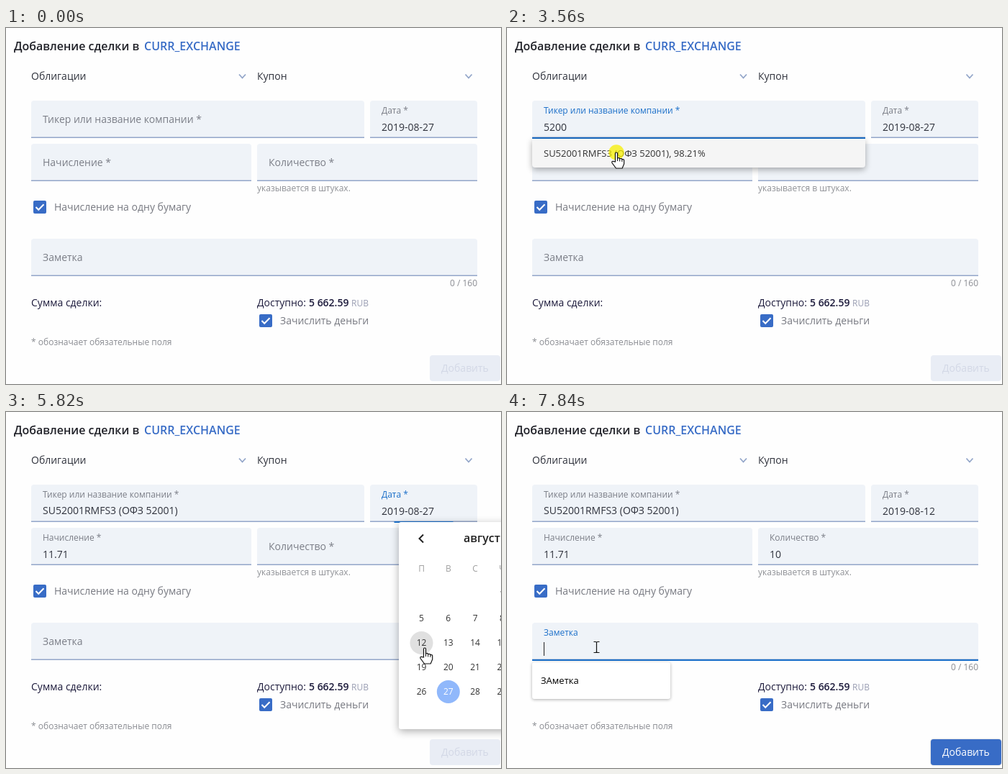
Write an HTML page with a canvas that moves like this. It is 688 px wide and 495 px high and loops after 8000 ms.

```html
<!DOCTYPE html>
<html lang="ru">
<head>
<meta charset="utf-8">
<style>
  html, body { margin: 0; width: 100%; height: 100%; overflow: hidden; background: #fefefe; }
  canvas { display: block; }
</style>
</head>
<body>
<canvas id="stage" width="688" height="495"></canvas>
<script>
const LOOP = 8000;
const ctx = document.getElementById('stage').getContext('2d');
const BLUE = '#1b6fc9', ACCENT = '#386cc6', DARK = '#30333d', NAVY = '#1d1b3c', GRAY = '#7b7e87', LINE = '#93a6c9';

// Event times, ms
const T = {
  tickerFocus: 740, search: 1316, searchFrozen: 2490, list: 2740, picked: 3700, accrual: 4070,
  dateFocus: 4400, calendar: 4560, day: 5900, calendarEnd: 5960,
  qtyFocus: 6210, qty1: 6330, qty2: 6430, noteFocus: 7470, notePanel: 7640
};
const clicks = [620, 3490, T.dateFocus, 5880, T.qtyFocus, T.noteFocus];
const keys = [1420, 1550, 1690, 1820];
const route = [
  [100, 507, 421], [540, 146, 128], [620, 148, 150], [3260, 148, 150], [3480, 152, 173],
  [3650, 152, 173], [4150, 541, 130], [4450, 541, 130], [4850, 600, 188], [4920, 600, 188],
  [5510, 585, 358], [5690, 585, 358], [5780, 582, 328], [5930, 582, 328], [6200, 414, 203],
  [7100, 414, 203], [7320, 200, 360], [7450, 124, 327]
];
const cursors = {
  hand: new Path2D('M-1.5 13V1.5a1.5 1.5 0 0 1 3 0V8q3-1 3.2.8q3-.9 3.2.9q2.8-.5 2.8 1.6V16l-2.5 6H-.5L-6 14.5q-.6-2.5 1.5-2.2z'),
  arrow: new Path2D('M0 0V16L4 12.5L6.5 18.5L9 17.5L6.5 11.5H11.5Z'),
  beam: new Path2D('M-4-7.5h2.5q1.5 0 1.5 1.5V6q0 1.5-1.5 1.5H-4M4-7.5H1.5Q0-7.5 0-6V6q0 1.5 1.5 1.5H4')
};

const clamp = v => Math.max(0, Math.min(1, v));
const smooth = v => (v = clamp(v), v * v * (3 - 2 * v));
const mix = (a, b, u) => a + (b - a) * u;
const ramp = (t, start, ms) => smooth((t - start) / ms);
const within = (p, x, y, w, h) => p.x >= x && p.x <= x + w && p.y >= y && p.y <= y + h;

function text(s, x, y, color = DARK, size = 14, weight = 400, align = 'left') {
  ctx.font = `${weight} ${size}px "Open Sans", sans-serif`;
  ctx.textAlign = align;
  ctx.fillStyle = color;
  ctx.fillText(s, x, y);
  return x + ctx.measureText(s).width;
}

function rect(x, y, w, h, color, radius = 0) {
  ctx.fillStyle = color;
  ctx.beginPath();
  ctx.roundRect(x, y, w, h, radius);
  ctx.fill();
}

function disc(x, y, r, color) {
  ctx.fillStyle = color;
  ctx.beginPath();
  ctx.arc(x, y, r, 0, 7);
  ctx.fill();
}

function polyline(points, color, width) {
  ctx.strokeStyle = color;
  ctx.lineWidth = width;
  ctx.beginPath();
  points.forEach(p => ctx.lineTo(...p));
  ctx.stroke();
}

function panel(x, y, w, h, color, blur, offset, radius = 3) {
  ctx.save();
  ctx.shadowColor = 'rgba(0,0,0,.32)';
  ctx.shadowBlur = blur;
  ctx.shadowOffsetY = offset;
  rect(x, y, w, h, color, radius);
  ctx.restore();
}

function faded(alpha, draw) {
  if (alpha <= 0) return;
  ctx.save();
  ctx.globalAlpha = alpha;
  draw();
  ctx.restore();
}

function field(t, x, y, w, label, value, o = {}) {
  const { focus = Infinity, blur = Infinity, floatAt = focus, caret = focus, baseline = 42, grow = 1 } = o;
  const focused = t >= focus && t < blur;
  const up = ramp(t, floatAt, 200);
  rect(x, y, w, 52, '#eff3f8', [4, 4, 0, 0]);
  rect(x, y + 50.5, w, 1.5, LINE);
  if (focused) {
    const line = w * grow * ramp(t, focus, 240);
    rect(x + (w - line) / 2, y + 51, line, 2, BLUE);
  }
  text(label, x + 16, y + mix(31, 18, up), focused ? BLUE : GRAY, mix(14, 12, up));
  const end = text(value, x + 16, y + baseline);
  const lit = t < caret || Math.floor((t - caret) / 530) % 2 === 0;
  if (focused && lit && !o.noCaret) rect(Math.round(end), y + 27, 1, 19, '#222');
}

function checkbox(x, y, label) {
  rect(x, y, 18, 18, ACCENT, 2);
  polyline([[x + 3.5, y + 9], [x + 7.2, y + 12.8], [x + 14.5, y + 5.2]], '#fff', 2);
  text(label, x + 29, y + 14, '#777981');
}

function select(x, label, arrowX) {
  text(label, x, 72);
  polyline([[arrowX - 4.5, 64.5], [arrowX, 69.5], [arrowX + 4.5, 64.5]], LINE, 1.8);
}

// Sliding segment of an indeterminate bar with a two second cycle
function searchBar(t) {
  const p = (Math.min(t, T.searchFrozen) - T.search) / 2000;
  const keyed = stops => {
    const i = stops.findIndex(s => p < s[0]);
    const [p0, v0] = stops[i - 1], [p1, v1] = stops[i];
    return mix(v0, v1, (p - p0) / (p1 - p0));
  };
  const center = keyed([[0, 0], [.25, .3765], [.4835, .8439], [1, 1.6028]]) - .0489;
  const size = keyed([[0, .08], [.1915, .4571], [.4415, .728], [1, .08]]);
  const left = clamp(center - size / 2), right = clamp(center + size / 2);
  rect(35, 152, 463, 2, '#b5d0ee');
  rect(35 + 463 * left, 152, 463 * (right - left), 2, BLUE);
}

function calendar(t) {
  panel(546, 153, 300, 288, '#fff', 12, 3);
  polyline([[580, 170.5], [574.5, 176], [580, 181.5]], '#222', 2);
  text('август 2019', 636, 181, '#222', 16, 600);
  [...'ПВСЧ'].forEach((d, i) => text(d, 577.5 + 37.3 * i, 222, '#a0a0a0', 12, 400, 'center'));
  for (let day = 1; day <= 31; day++) {
    const cell = day + 2, x = 577.5 + 37.3 * (cell % 7), y = 253 + 34 * Math.floor(cell / 7);
    if (day === 27) disc(x, y, 16, '#90b8fb');
    if (day === 12 && t > 5740) disc(x, y, 16, '#e0e0e0');
    text(day, x, y + 4, day === 27 ? '#fff' : '#333', 12, 400, 'center');
  }
}

function pointerAt(t) {
  const i = route.findIndex(p => p[0] > t);
  if (i < 0) return { x: 124, y: 327 };
  const [t0, x0, y0] = route[i - 1], [t1, x1, y1] = route[i];
  const u = smooth((t - t0) / (t1 - t0));
  return { x: mix(x0, x1, u), y: mix(y0, y1, u) };
}

function cursorKind(t, p) {
  const listOpen = t > T.list && t < T.picked + 100 && within(p, 35, 154, 463, 40);
  const calendarOpen = t > T.calendar && t < T.calendarEnd && within(p, 546, 153, 142, 288);
  if (listOpen || calendarOpen || within(p, 506, 101, 149, 52)) return 'hand';
  const overField = within(p, 35, 101, 463, 52) || within(p, 35, 161, 306, 52) ||
    within(p, 349, 161, 306, 52) || within(p, 35, 293, 620, 52);
  return overField ? 'beam' : 'arrow';
}

function drawPointer(t) {
  if (t < 100) return;
  const p = pointerAt(t), kind = cursorKind(t, p);
  const click = clicks.find(c => t >= c && t < c + 200);
  if (click) disc(p.x, p.y, 15 - (t - click) * .06, 'rgba(245,238,0,.75)');
  ctx.save();
  ctx.translate(Math.round(p.x), Math.round(p.y));
  ctx.lineWidth = 1.2;
  ctx.strokeStyle = '#111';
  if (kind !== 'beam') {
    ctx.fillStyle = '#fff';
    ctx.fill(cursors[kind]);
  } else {
    ctx.translate(.5, 0);
  }
  ctx.stroke(cursors[kind]);
  if (kind === 'hand') {
    ctx.lineWidth = 1;
    ctx.stroke(new Path2D('M1.5 8v4M4.7 9v3.5M7.9 10v3'));
  }
  ctx.restore();
}

function draw(t) {
  rect(0, 0, 688, 495, '#fefefe');
  text('Добавление сделки в', 11, 31, '#212229', 16, 600);
  text('CURR_EXCHANGE', 192, 31, ACCENT, 16, 600);
  select(35, 'Облигации', 328.5);
  select(349, 'Купон', 643);

  const picked = t >= T.picked;
  const query = '5200'.slice(0, keys.filter(k => t >= k).length);
  const quantity = t >= T.qty2 ? 10 : t >= T.qty1 ? 1 : 0;

  field(t, 35, 101, 463, 'Тикер или название компании *', picked ? 'SU52001RMFS3 (ОФЗ 52001)' : query, {
    focus: T.tickerFocus, blur: T.dateFocus, noCaret: picked,
    caret: t < keys[0] ? 660 : t < keys[3] ? t : keys[3], baseline: picked ? 41 : 42
  });
  field(t, 506, 101, 149, 'Дата *', t < T.day ? '2019-08-27' : '2019-08-12', {
    focus: T.dateFocus, blur: T.qtyFocus, floatAt: -1000, noCaret: true, grow: .55
  });
  field(t, 35, 161, 306, 'Начисление *', t >= T.accrual ? '11.71' : '', { floatAt: T.accrual });
  field(t, 349, 161, 306, 'Количество *', quantity || '', {
    focus: T.qtyFocus, blur: T.noteFocus, caret: 6530
  });
  text('указывается в штуках.', 349, 227, '#8f9196', 12);
  checkbox(38, 240, 'Начисление на одну бумагу');
  field(t, 35, 293, 620, 'Заметка', '', { focus: T.noteFocus });
  text('0 / 160', 655, 359, '#8a8c92', 12, 400, 'right');

  text('Сумма сделки:', 35, 387, NAVY);
  if (quantity) {
    const end = text((11.71 * quantity).toFixed(2), 137, 387, NAVY, 16, 600);
    text('RUB', end + 4, 387, '#9a9eb3', 12);
  }
  text('Доступно:', 349, 387, NAVY);
  text('5 662.59', 421, 387, NAVY, 14, 600);
  text('RUB', 480, 387, '#9a9eb3', 12);
  checkbox(352, 398, 'Зачислить деньги');
  text('* обозначает обязательные поля', 35, 441, '#8a8c92', 12);

  rect(589, 455, 98, 36, '#e9edf5', 4);
  text('Добавить', 605, 478, '#d3d8e6');
  faded(ramp(t, T.qty1, 100), () => {
    panel(589, 455, 98, 36, ACCENT, 2, 0, 4);
    text('Добавить', 605, 478, '#fff');
  });

  if (t >= keys[0] && t < T.list) searchBar(t);
  faded(ramp(t, T.list, 220) * (1 - ramp(t, T.picked, 100)), () => {
    panel(35, 154, 463, 40, '#f5f5f5', 8, 3, [0, 0, 4, 4]);
    text('SU52001RMFS3 (ОФЗ 52001), 98.21%', 51, 179, '#333', 13);
  });
  faded(ramp(t, T.calendar, 150) * (1 - ramp(t, T.calendarEnd, 100)), () => calendar(t));
  if (t >= T.qty1 && t < T.noteFocus) {
    panel(349, 215, 306, 88, '#fff', 4, 1);
    text('100', 361, 246, '#000', 13);
    text('10', 361, 282, '#000', 13);
  }
  if (t >= T.notePanel) {
    panel(35, 348, 192, 51, '#fff', 4, 1);
    text('ЗАметка', 47, 378, '#000', 13);
  }
  drawPointer(t);
}

function frame() {
  draw(performance.now() % LOOP);
  requestAnimationFrame(frame);
}
frame();
</script>
</body>
</html>
```
